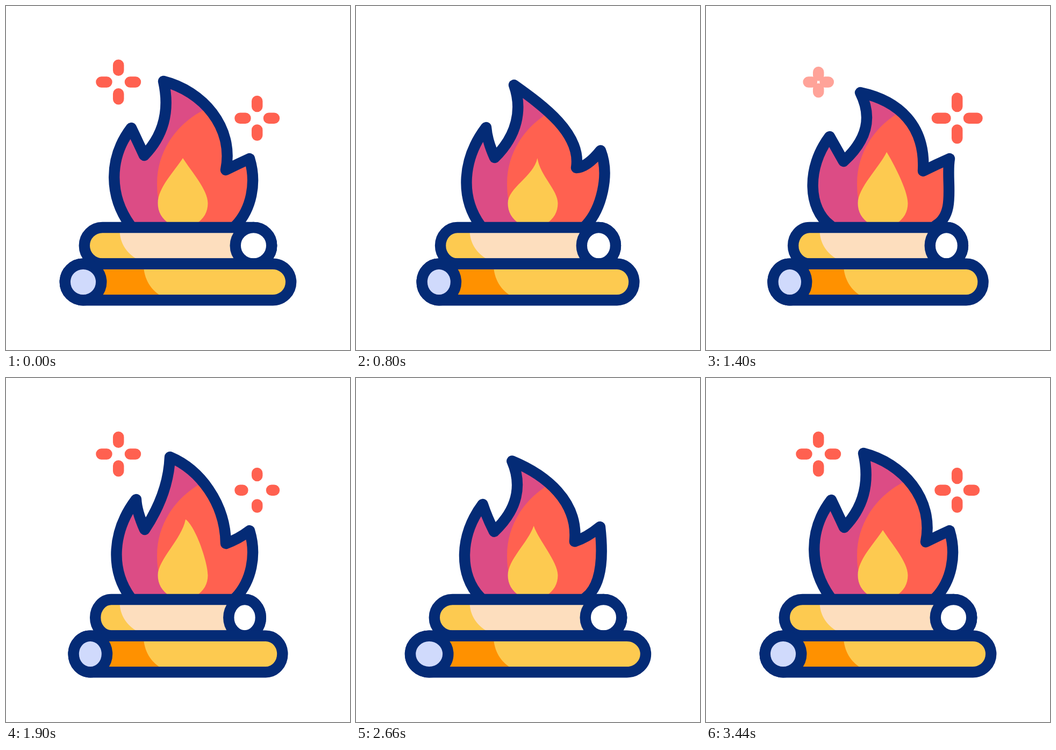
An HTML page that plays this animation: 640 by 640 pixels, repeating every 3500 ms.

```html
<!DOCTYPE html>
<html lang="en">
<head>
<meta charset="utf-8">
<title>Campfire</title>
<style>
  html, body { margin: 0; width: 100%; height: 100%; overflow: hidden; background: #fff; }
  svg { display: block; width: 100%; height: 100%; }
  .line { fill: none; stroke: #042b76; stroke-width: 20.4; stroke-linejoin: round; stroke-linecap: round; }
  .spark { fill: none; stroke: #ff6150; stroke-width: 20.5; stroke-linecap: round; }
</style>
</head>
<body>
<svg viewBox="0 0 640 640">
  <defs>
    <clipPath id="flameClip"><path id="flameMask"/></clipPath>
    <clipPath id="upperClip"><rect id="upperMask"/></clipPath>
    <clipPath id="lowerClip"><rect id="lowerMask"/></clipPath>
  </defs>

  <path id="sparkL" class="spark" transform="translate(209.2 141.6)"/>
  <path id="sparkR" class="spark" transform="translate(467.2 208.8)"/>

  <g clip-path="url(#flameClip)">
    <rect x="180" y="120" width="300" height="300" fill="#dc4c85"/>
    <path fill="#ff6150" d="M380 188C330 208 281 260 281 330C281 360 287 385 300 404V420H480V150Z"/>
  </g>
  <path id="drop" fill="#fdca50"/>
  <path id="flameLine" class="line"/>

  <g clip-path="url(#upperClip)">
    <rect x="100" y="400" width="440" height="92" fill="#fddebe"/>
    <path fill="#fdca50" d="M100 400H211.500V418C212 440 223 459 244 471L262 492H100Z"/>
  </g>
  <rect id="upperLine" class="line"/>
  <ellipse id="upperEnd" class="line" style="fill:#fff"/>

  <g clip-path="url(#lowerClip)">
    <rect x="60" y="468" width="520" height="92" fill="#fdca50"/>
    <path fill="#ff9100" d="M60 468H256V486C258 508 268 526 286 538L300 560H60Z"/>
  </g>
  <rect id="lowerLine" class="line"/>
  <ellipse id="lowerEnd" class="line" style="fill:#d0dafc"/>
</svg>
<script>
const LOOP = 3500;
const $ = id => document.getElementById(id);
const set = (id, attrs) => { for (const k in attrs) $(id).setAttribute(k, attrs[k]); };
const ease = x => { x = Math.min(1, Math.max(0, x)); return x * x * (3 - 2 * x); };
const mix = (a, b, x) => a + (b - a) * x;
const add = ([x, y], [dx, dy], k = 1) => [x + dx * k, y + dy * k];
// Rises from 0 to 1 at the peak and falls back.
const swell = (t, from, peak, to) => ease((t - from) / (peak - from)) * (1 - ease((t - peak) / (to - peak)));

// The fire at rest; dropR and dropL are relative to the drop's tip.
const fire = {
  lowL: [193, 355], left: [233, 227], leftBend: [245, 252],
  notch: [257, 278], rise: [299, 235], neck: [303, 185], top: [293, 140],
  crown: [365, 158], side: [425, 225], nook: [409, 305], rightBend: [431, 294],
  right: [453, 284], outR: [467, 330], lowR: [456, 378],
  dropR: [16, 25], dropL: [-16, 25]
};

// Each move shifts some of the points.
const moves = {
  lean: {
    left: [9, -1], leftBend: [-1, -1], notch: [1, 4], rise: [1, 6], neck: [7, 7], top: [1, 7],
    crown: [-16, 28], side: [-5, 13], nook: [1, -4], rightBend: [-1, 6], right: [2, -15], outR: [6, -15],
    dropR: [-11, 8], dropL: [9, 9]
  },
  dip: {
    lowL: [-3, 23], left: [-3, 16], leftBend: [-2, 14], notch: [-1, 11], rise: [3, 12], neck: [6, 20],
    top: [-6, 21], crown: [-7, 18], side: [-16, -3], nook: [-5, 2], rightBend: [-3, 1],
    outR: [-21, -5], lowR: [10, 7], dropR: [-5, -7], dropL: [2, 4]
  },
  tall: {
    left: [9, -1], leftBend: [-2, -4], notch: [1, 4], rise: [-14, 6], neck: [0, 10], top: [12, 7],
    crown: [-5, 12], side: [-17, 7], nook: [0, 3], rightBend: [1, 6], dropR: [2, -13], dropL: [9, 12]
  }
};

function firePose(t) {
  const weight = {
    lean: swell(t, 0, 800, 1400) + swell(t, 1900, 2360, 2940),
    dip: swell(t, 800, 1400, 1900) + swell(t, 2360, 2940, 3440),
    tall: swell(t, 1400, 1900, 2360)
  };
  const pose = { ...fire };
  for (const name in moves)
    for (const key in moves[name]) pose[key] = add(pose[key], moves[name][key], weight[name]);
  return pose;
}

function drawFlame(p) {
  const d = `M235 412L231 408C${p.lowL} ${add(p.left, [-44, 58])} ${p.left}` +
    `Q${p.leftBend} ${p.notch}C${p.rise} ${p.neck} ${p.top}` +
    `C${p.crown} ${p.side} ${p.nook}Q${p.rightBend} ${p.right}` +
    `C${p.outR} ${p.lowR} 428 408L424 412`;
  set('flameLine', { d });
  set('flameMask', { d });
}

function drawDrop(p, t) {
  const tip = [
    329 + 8.5 * swell(t, 0, 700, 2700 + 740),
    283 - 20 * swell(t, 750, 1950, 3200)
  ];
  set('drop', {
    d: `M${tip}C${add(tip, p.dropR)} 375.500 342 375.500 367C375.500 383 368 396 354 405H304` +
       `C290 396 282.500 383 282.500 367C282.500 338 ${add(tip, p.dropL)} ${tip}Z`
  });
}

// Grips fast, drifts inward, then springs out past its length and settles.
function squeeze(t, grip, drift, release) {
  const held = grip * (1 - Math.exp(-t / 250)) + drift * Math.min(t, release);
  const sprung = mix(held, -10, ease((t - release) / 390));
  return mix(sprung, 0, ease((t - release - 390) / 185));
}

// A log squeezed sideways about the middle; side puts its cut end left or right.
function drawLog(name, half, cy, inset, side) {
  const r = 33.75, s = (half - inset) / half;
  const box = { x: 320 - half * s, y: cy - r, width: 2 * half * s, height: 2 * r, rx: r * s, ry: r };
  set(name + 'Line', box);
  set(name + 'Mask', box);
  set(name + 'End', { cx: 320 + side * (half - r) * s, cy, rx: r * s, ry: r });
}

// Four dashes shrink outward, vanish, then pop back with an overshoot; this happens twice.
function drawSpark(id, t, delay) {
  const period = 1610, hide = 170, show = 1090, peak = 1290;
  const near = 21.75, far = 31.75, burst = 41.75;
  let v = t - delay;
  if (v > period) v -= period;
  let inner = near, outer = far, opacity = 1;
  if (v < show) {
    const x = (v - hide) / 240;
    inner = mix(near, far, ease(x));
    opacity = 1 - ease((x - 0.6) / 0.4);
  } else if (v < peak) {
    const x = (v - show) / (peak - show);
    inner = mix(8.5, near, ease(x));
    outer = mix(9.2, burst, ease(x));
    opacity = Math.min(1, x * 1.63);
  } else {
    outer = mix(burst, far, ease((v - peak) / 240));
  }
  const dash = [[0, -1], [1, 0], [0, 1], [-1, 0]].map(([x, y]) =>
    `M${x * inner} ${y * inner}L${x * outer} ${y * outer}`);
  set(id, { d: dash.join(''), opacity });
}

function draw(now) {
  const t = now % LOOP;
  const pose = firePose(t);
  drawFlame(pose);
  drawDrop(pose, t);
  drawLog('upper', 174.25, 445.75, squeeze(t, 5, 0.0081, 2410), 1);
  drawLog('lower', 210.25, 513.5, squeeze(t, 11.5, 0.0023, 2230), -1);
  drawSpark('sparkL', t, 240);
  drawSpark('sparkR', t, 0);
}

const start = performance.now();
function tick() {
  draw(performance.now() - start);
  requestAnimationFrame(tick);
}
tick();
</script>
</body>
</html>
```
